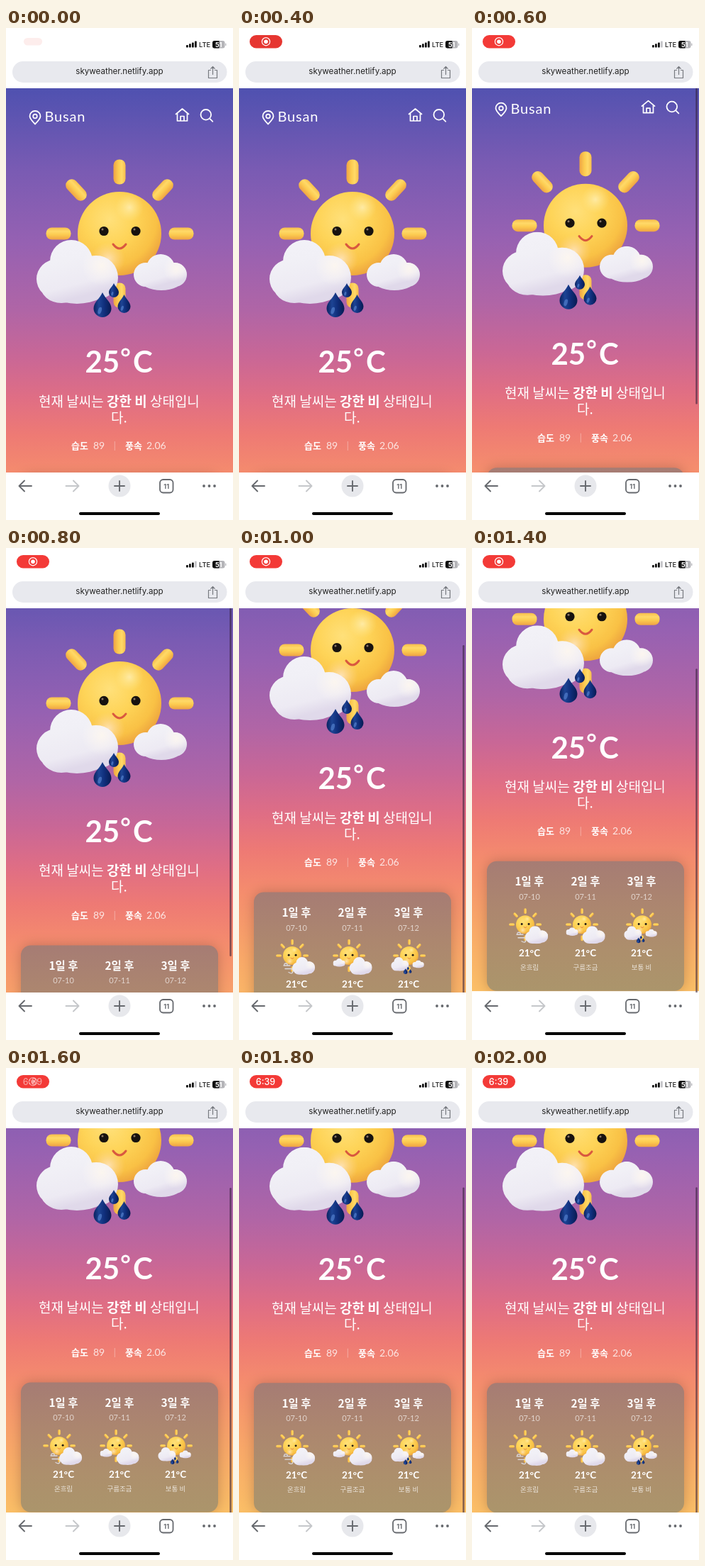
Animation of 320x694 px, one loop 2.1 s. Source, as an HTML page with a canvas:

```html
<!DOCTYPE html>
<html lang="ko">
<head>
<meta charset="utf-8">
<title>Weather</title>
<style>
html, body { margin: 0; width: 100%; height: 100%; overflow: hidden; background: #fff; }
canvas { display: block; width: 320px; height: 694px; }
</style>
</head>
<body>
<canvas id="stage"></canvas>
<script>
const W = 320, H = 694, LOOP = 2100, STEP = 100;
const TOP = 85, BOTTOM = 627, PAGE_END = 815;
const KR = '"Noto Sans CJK KR", "Noto Sans CJK", sans-serif';
const ROUND = 'Lato, "Noto Sans CJK KR", "Noto Sans CJK", sans-serif';
const UI = 'Inter, sans-serif';
const SOFT = 'rgba(255,255,255,.8)';

const canvas = document.getElementById('stage');
const c = canvas.getContext('2d');
const dpr = window.devicePixelRatio || 1;
canvas.width = W * dpr;
canvas.height = H * dpr;

const clamp = v => Math.max(0, Math.min(1, v));

function text(s, x, y, font, color = '#fff', align = 'left') {
  c.font = font;
  c.fillStyle = color;
  c.textAlign = align;
  c.fillText(s, x, y);
}

function box(x, y, w, h, r, color) {
  c.beginPath();
  c.roundRect(x, y, w, h, r);
  c.fillStyle = color;
  c.fill();
}

function disc(x, y, r, color) {
  c.beginPath();
  c.arc(x, y, r, 0, 7);
  c.fillStyle = color;
  c.fill();
}

function ring(x, y, r, color, width) {
  c.beginPath();
  c.arc(x, y, r, 0, 7);
  c.strokeStyle = color;
  c.lineWidth = width;
  c.stroke();
}

function stroke(path, color, width) {
  c.strokeStyle = color;
  c.lineWidth = width;
  c.lineCap = c.lineJoin = 'round';
  c.stroke(new Path2D(path));
}

function addStops(g, stops) {
  stops.forEach(([at, color]) => g.addColorStop(at, color));
  return g;
}

const linear = (x0, y0, x1, y1, ...stops) =>
  addStops(c.createLinearGradient(x0, y0, x1, y1), stops);

const radial = (x, y, r, ...stops) =>
  addStops(c.createRadialGradient(x, y, 0, x, y, r), stops);

// Runs draw with the point (ox, oy) placed at (x, y) and scaled by k.
function place(x, y, k, ox, oy, draw) {
  c.save();
  c.translate(x, y);
  c.scale(k, k);
  c.translate(-ox, -oy);
  draw();
  c.restore();
}

function ray(x, y, angle) {
  c.save();
  c.translate(x, y);
  c.rotate(angle);
  box(-17.5, -8.5, 35, 17, 8, linear(0, -8, 0, 8,
    [0, '#f8c04e'], [0.3, '#ffd968'], [0.6, '#fccb50'], [1, '#f0a645']));
  c.restore();
}

function sun() {
  const q = Math.PI / 2;
  ray(160, 203, q);
  ray(99, 228.5, 0.82);
  ray(221, 228.5, -0.82);
  ray(74, 290, 0);
  ray(247, 290, 0);
  ray(160, 377, q);
  disc(160, 290, 59, radial(146, 270, 88,
    [0, '#ffe07a'], [0.4, '#fed458'], [0.75, '#f9c145'], [1, '#e99a3c']));
  disc(144, 326, 24, radial(144, 326, 24,
    [0, 'rgba(255,232,205,.8)'], [1, 'rgba(255,215,150,0)']));
  disc(174, 253, 20, radial(174, 253, 20,
    [0, 'rgba(255,243,195,.7)'], [1, 'rgba(255,235,150,0)']));
  for (const x of [138, 183]) {
    disc(x, 286.5, 6.6, '#17120f');
    disc(x - 2, 284, 1.5, '#8a7768');
  }
  stroke('M151 305Q160 317 169 305', '#d9583f', 3);
}

const BIG = [[92, 329, 30, 30], [72, 354, 29, 28], [127, 352, 31, 31],
  [78, 362, 30, 26], [100, 361, 48, 28]];
const SMALL = [[218, 339, 20, 20], [197, 348, 17, 17], [238, 348, 17, 17],
  [219, 354, 31, 16]];

function cloud(lobes, x, y, w, h) {
  c.save();
  c.beginPath();
  for (const [lx, ly, rx, ry] of lobes) {
    c.moveTo(lx + rx, ly);
    c.ellipse(lx, ly, rx, ry, 0, 0, 7);
  }
  c.clip();
  c.fillStyle = linear(x, y, x + w * 0.2, y + h,
    [0, '#f3f2f8'], [0.4, '#f1f0f6'], [0.8, '#edeaf3'], [1, '#e0d9ea']);
  c.fillRect(x, y, w, h);
  const gx = x + w * 0.8, gy = y + h * 0.4;
  disc(gx, gy, w * 0.25, radial(gx, gy, w * 0.25,
    [0, 'rgba(255,248,238,.8)'], [1, 'rgba(255,250,245,0)']));
  c.restore();
}

const bigCloud = () => cloud(BIG, 43, 299, 115, 90);
const smallCloud = () => cloud(SMALL, 180, 319, 75, 51);

function drop(x, y, w, h) {
  const r = w / 2, low = y + h - r;
  c.beginPath();
  c.moveTo(x, y);
  c.bezierCurveTo(x + r * 0.3, y + h * 0.25, x + r, low - r * 0.7, x + r, low);
  c.arc(x, low, r, 0, Math.PI);
  c.bezierCurveTo(x - r, low - r * 0.7, x - r * 0.3, y + h * 0.25, x, y);
  c.fillStyle = linear(x - r, 0, x + r, 0,
    [0, '#0b2260'], [0.3, '#1d4494'], [0.6, '#102f7c'], [1, '#081b52']);
  c.fill();
  c.beginPath();
  c.ellipse(x - r * 0.3, low + r * 0.25, r * 0.2, r * 0.4, 0.3, 0, 7);
  c.fillStyle = 'rgba(98,145,222,.55)';
  c.fill();
}

function rain() {
  sun();
  smallCloud();
  bigCloud();
  drop(152, 360, 14, 20);
  drop(166.5, 376, 18, 26);
  drop(136, 373, 25, 35);
}

function wind() {
  place(75, 721, 0.22, 160, 290, sun);
  stroke('M63 735h9M65 739.5h8q4 0 3 4t-6 1M64 735q-1-3 2-3t2 3', 'rgba(225,225,232,.9)', 1.3);
  place(91, 735.5, 0.28, 100, 344, bigCloud);
}

function partly() {
  place(155, 721, 0.22, 160, 290, sun);
  place(141, 731, 0.23, 217, 345, smallCloud);
  place(171.5, 735.5, 0.28, 100, 344, bigCloud);
}

const showers = () => place(240, 721, 0.22, 160, 290, rain);

const DAYS = [
  [81, '1일 후', '07-10', '온흐림', wind],
  [160, '2일 후', '07-11', '구름조금', partly],
  [239, '3일 후', '07-12', '보통 비', showers]
];

function header() {
  stroke('M41 135.5Q33.5 128 33.5 124.5a7.5 7.5 0 0 1 15 0Q48.5 128 41 135.5z'
    + 'M38.2 124.5a2.8 2.8 0 1 0 5.6 0a2.8 2.8 0 1 0-5.6 0', '#fff', 1.8);
  c.letterSpacing = '0.8px';
  text('Busan', 54.5, 132, '20px ' + ROUND);
  c.letterSpacing = '0px';
  stroke('M239.5 121.5L248.5 114L257.5 121.5M241.5 120.5V131H255.5V120.5'
    + 'M246 131v-6.5h5v6.5', '#fff', 1.7);
  stroke('M274.5 122.3a7.3 7.3 0 1 0 14.6 0a7.3 7.3 0 1 0-14.6 0M287.3 127.8l4 4', '#fff', 1.8);
}

function summary() {
  const big = 'bold 42px ' + ROUND;
  text('25', 111.5, 486.3, big);
  ring(168.5, 457.5, 4.6, '#fff', 3);
  text('C', 179, 486.3, big);

  let x = 46;
  for (const [s, weight] of [['현재 날씨는 ', 300], ['강한 비', 700], [' 상태입니', 300]]) {
    text(s, x, 533.5, weight + ' 19px ' + KR);
    x += c.measureText(s).width;
  }
  text('다.', 148, 556.5, '300 19px ' + KR);

  text('습도', 92, 594, 'bold 13px ' + KR);
  text('89', 123, 594, '14px ' + ROUND, SOFT);
  text('풍속', 168, 594, 'bold 13px ' + KR);
  text('2.06', 198, 594, '14px ' + ROUND, SOFT);
  c.fillStyle = 'rgba(255,255,255,.35)';
  c.fillRect(152.8, 583, 1, 13);
}

function forecast() {
  c.save();
  c.shadowColor = 'rgba(70,40,40,.3)';
  c.shadowBlur = 18 * dpr;
  box(21, 631.5, 278, 183, 14, linear(0, 631, 0, 815,
    [0, '#a67c74'], [0.35, '#ac866f'], [0.7, '#ad8f6c'], [1, '#ab956b']));
  c.restore();
  for (const [x, day, date, sky, icon] of DAYS) {
    text(day, x, 666, 'bold 15.5px ' + KR, '#fff', 'center');
    text(date, x, 685.5, '11px ' + ROUND, 'rgba(255,255,255,.65)', 'center');
    icon();
    text('21°C', x, 766, 'bold 13.5px ' + ROUND, '#fff', 'center');
    text(sky, x, 785, '300 9.5px ' + KR, 'rgba(255,255,255,.75)', 'center');
  }
}

function page(scroll) {
  c.save();
  c.beginPath();
  c.rect(0, TOP, W, BOTTOM - TOP);
  c.clip();
  c.save();
  c.translate(0, -scroll);
  c.beginPath();
  c.rect(0, TOP, W, PAGE_END - TOP);
  c.clip();
  c.fillStyle = linear(0, TOP, 0, PAGE_END,
    [0, '#4f51b0'], [0.16, '#7a5bb3'], [0.3, '#9661b2'], [0.43, '#b065a6'],
    [0.52, '#c96796'], [0.6, '#e06e84'], [0.67, '#ee7a74'], [0.75, '#f58d6d'],
    [0.88, '#f9a968'], [1, '#fbbf66']);
  c.fillRect(0, TOP, W, PAGE_END - TOP);
  header();
  rain();
  summary();
  forecast();
  c.restore();
  if (scroll > 1) box(315.3, 26 + 0.76 * scroll, 2.5, 496, 1.2, 'rgba(50,30,55,.6)');
  c.restore();
}

function pill(t) {
  const grow = clamp(t / 300), swap = clamp((t - 1500) / 200);
  c.save();
  c.globalAlpha = 0.09 + 0.91 * grow;
  place(38, 19.2, 0.57 + 0.43 * grow, 38, 19.2, () =>
    box(15, 10, 46, 18.4, 9.2, t < 500 ? '#e63631' : '#f33a37'));
  c.globalAlpha = grow * grow * (1 - swap);
  ring(38, 19.2, 5.6, '#fff', 1.2);
  disc(38, 19.2, 2.8, '#fff');
  c.globalAlpha = swap;
  text('6:39', 37.5, 23.6, '500 12.5px ' + UI, '#fff', 'center');
  c.restore();
}

function statusBar(t) {
  pill(t);
  const bars = t < 600 ? 4 : 3;
  for (let i = 0; i < 4; i++) {
    const h = 3.5 + i * 1.8;
    box(254 + i * 4, 27.5 - h, 2.8, h, 0.8, i < bars ? '#111' : '#c4c4c8');
  }
  text('LTE', 272, 27, '500 9.4px ' + UI, '#222');
  box(291, 18, 17.5, 10.5, 3, '#b4b4b8');
  box(291, 18, 9.5, 10.5, [3, 0, 0, 3], '#111');
  box(309.2, 21.5, 1.2, 3.6, 0.6, '#b4b4b8');
  text('51', 299.8, 26.6, 'bold 9px ' + UI, '#fff', 'center');
}

function addressBar() {
  box(9, 47, 302.5, 30, 15, '#e8e9ee');
  text('skyweather.netlify.app', 160, 65.3, '11.6px ' + UI, '#222', 'center');
  stroke('M288.5 59.5H285.5V70.5H297.5V59.5H294.5M291.5 65.5V54.8M288.7 57.3L291.5 54.5L294.3 57.3',
    '#777a80', 1.2);
}

function toolbar() {
  const grey = '#66696e';
  stroke('M36 646H18.8M26 638.5L18.5 646L26 653.5', grey, 1.9);
  stroke('M84.5 646H102M95 638.5L102.5 646L95 653.5', '#c5c7ca', 1.9);
  disc(160, 646, 15.5, '#e7e8ec');
  stroke('M153 646H167M160 639V653', grey, 1.9);
  c.beginPath();
  c.roundRect(217, 637, 18.5, 18.5, 4.5);
  c.strokeStyle = grey;
  c.lineWidth = 1.8;
  c.stroke();
  text('11', 226.2, 649.6, 'bold 9px ' + UI, grey, 'center');
  for (const x of [279, 286.5, 294]) disc(x, 646, 1.9, grey);
  box(103, 683, 114, 4, 2, '#000');
}

// Swipe up past the end, then settle back.
function scrollAt(t) {
  if (t > 1200) return 187 + 7.5 * Math.exp((1200 - t) / 200);
  const u = clamp((t - 488) / 771);
  return 198 * u * u * (3 - 2 * u);
}

function frame() {
  const t = Math.floor(performance.now() % LOOP / STEP) * STEP;
  c.setTransform(dpr, 0, 0, dpr, 0, 0);
  c.fillStyle = '#fff';
  c.fillRect(0, 0, W, H);
  page(scrollAt(t));
  statusBar(t);
  addressBar();
  toolbar();
  requestAnimationFrame(frame);
}
frame();
</script>
</body>
</html>
```
